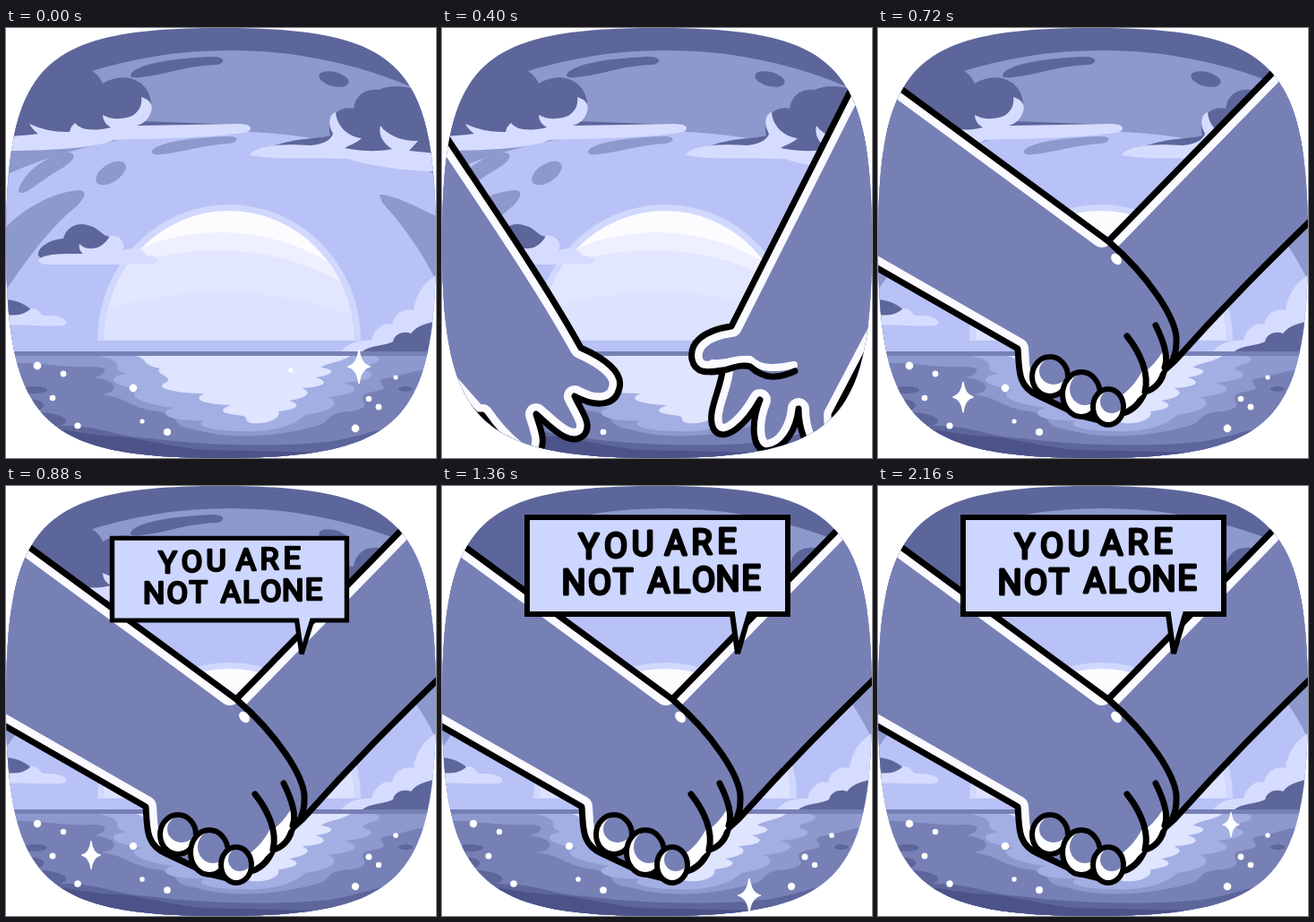
An HTML page for the animation above (2240 ms loop, 480x480 px).

```html
<!DOCTYPE html>
<html lang="en">
<head>
<meta charset="utf-8">
<title>You are not alone</title>
<style>
html, body { margin: 0; width: 100%; height: 100%; overflow: hidden; background: #fff }
svg { display: block; width: 100vw; height: 100vh }
.deep { fill: #4b5388 }
.dark { fill: #5d669b }
.skin { fill: #7780b5 }
.mid { fill: #8d98cc }
.soft { fill: #a3aee3 }
.light { fill: #b8c2f6 }
.pale { fill: #d6dcff }
.white { fill: #fff }
.ink, .shine { fill: none; stroke: #000; stroke-width: 7; stroke-linecap: round; stroke-linejoin: round }
.shine { stroke: #fafaff; stroke-width: 24 }
.thin { stroke-width: 8 }
text { font: 38px Roboto, "Liberation Sans", sans-serif; text-anchor: middle; stroke: #000; stroke-width: 3; stroke-linejoin: round }
</style>
</head>
<body>
<svg viewBox="0 0 480 480">
<defs>
  <clipPath id="frame"><path d="M240 0C440 0 480 40 480 240S440 480 240 480 0 440 0 240 40 0 240 0Z"/></clipPath>
  <clipPath id="sun"><path d="M110 348A139 144 0 0 1 388 348Z"/></clipPath>
</defs>
<g clip-path="url(#frame)">
  <!-- sky -->
  <path class="dark" d="M0 0H480V480H0Z"/>
  <ellipse class="mid" cx="250" cy="360" rx="423" ry="335"/>
  <ellipse class="light" cx="240" cy="360" rx="400" ry="245"/>
  <path class="dark" d="M139 52C145 41 180 34 230 32 244 32 246 38 236 41 200 42 180 52 150 55 143 56 138 55 139 52Z"/>
  <ellipse class="dark" cx="366" cy="57" rx="17" ry="8" transform="rotate(14 366 57)"/>
  <path class="mid" d="M163 137C170 127 210 122 248 121 260 121 261 126 250 129 220 130 195 140 172 141 165 142 162 140 163 137Z"/>
  <ellipse class="mid" cx="117" cy="162" rx="19" ry="10" transform="rotate(-33 117 162)"/>
  <path class="mid" d="M14 181C20 160 45 143 68 139 80 139 77 147 65 155 45 166 32 178 22 183 17 185 13 184 14 181Z"/>
  <path class="mid" d="M0 222C22 200 52 184 80 181 90 181 90 187 80 198 52 220 25 255 0 293Z"/>
  <path class="mid" d="M417 186C430 185 460 200 480 210V282C465 250 438 214 420 195Z"/>

  <!-- sun -->
  <path fill="#d0d8fd" d="M102 349A147 152 0 0 1 396 349Z"/>
  <g clip-path="url(#sun)">
    <path fill="#fcfcff" d="M100 190H400V350H100Z"/>
    <ellipse fill="#eef0ff" cx="240" cy="380" rx="190" ry="152"/>
    <ellipse fill="#e2e6ff" cx="235" cy="400" rx="215" ry="152"/>
    <ellipse fill="#dde2ff" cx="240" cy="420" rx="240" ry="125"/>
  </g>

  <!-- clouds -->
  <path class="dark" d="M0 45C35 35 50 34 72 39 92 42 104 52 108 62 130 48 158 56 162 82 163 94 155 100 150 104L262 108 200 118 0 126Z"/>
  <path class="pale" d="M0 121Q22 120 36 118 30 114 26 107 48 117 71 116 72 110 77 106 86 118 117 111 108 106 108 97 122 105 141 98 153 90 151 77 167 82 161 96 157 106 146 109L258 107C272 107 277 111 270 116 220 124 160 123 120 125 100 135 40 137 0 137Z"/>
  <path class="dark" d="M298 132C325 122 350 124 362 120 357 98 374 86 388 90 390 76 400 67 416 69 435 60 460 68 480 75V142H370Z"/>
  <path class="pale" d="M272 142C278 131 310 129 340 131 354 130 363 125 365 118 358 105 362 96 368 94 369 110 383 122 397 123 391 129 382 131 378 134 404 139 422 137 431 135 418 127 416 116 418 109 426 121 446 127 460 126L450 137 480 140V160C445 160 402 153 382 146 345 144 304 148 272 142Z"/>
  <path class="dark" d="M36 254C35 244 50 236 64 235 68 220 82 216 94 221 104 223 108 234 118 233 126 240 122 252 118 258L40 258Z"/>
  <path class="pale" d="M36 259C42 251 70 252 86 252 82 249 81 244 82 241 90 250 108 248 116 232 130 230 134 244 130 248 147 243 156 250 157 254 173 254 174 264 160 264H44Q36 263 36 259Z"/>
  <path class="dark" d="M0 303C16 304 28 312 34 322L0 332Z"/>
  <path class="pale" d="M0 320C16 322 22 318 28 313 38 313 38 320 42 321 66 320 72 329 64 332 40 334 20 330 0 332Z"/>
  <path class="pale" d="M374 361C382 351 396 348 408 349 411 336 422 328 431 331 433 318 446 312 455 315 457 296 468 283 480 276V361Z"/>
  <path class="dark" d="M398 361C406 354 424 355 432 350 434 340 446 338 452 341 460 330 472 331 480 326V361Z"/>

  <!-- sea -->
  <path class="mid" d="M0 361H480V480H0Z"/>
  <path class="skin" d="M0 361H480V366H0Z"/>
  <path class="skin" d="M0 374C30 372 70 380 96 378 120 378 110 388 98 390 130 394 124 408 106 409 140 414 136 424 170 428 200 434 180 444 210 448 250 460 300 456 340 446 370 440 350 430 385 428 420 422 380 412 410 406 440 402 400 394 430 390 450 386 460 380 480 382V480H0Z"/>
  <path class="soft" d="M104 366H412C430 374 392 376 400 382 420 388 400 394 378 396 404 404 380 410 360 412 380 422 350 430 334 432 320 446 290 452 262 450 230 450 208 444 222 438 180 440 166 428 188 424 150 420 130 408 152 404 120 400 108 390 134 386 112 380 140 374 104 366Z"/>
  <path class="pale" style="fill:#dfe4ff" d="M145 366H384C378 372 356 374 352 379 372 382 362 388 346 390 364 396 352 401 330 402 346 408 330 414 316 416 336 422 316 427 304 428 308 436 290 443 274 441 262 438 276 434 258 432 236 430 240 424 252 421 220 420 206 414 222 408 190 408 164 402 178 396 190 390 164 386 172 380 150 376 160 370 145 366Z"/>
  <path class="dark" d="M0 398C25 400 34 410 20 414 50 414 46 426 30 428 70 430 74 440 60 444 110 444 120 456 160 458 220 466 300 468 360 462 400 456 420 444 480 436V480H0Z"/>
  <path class="deep" d="M0 428C30 436 50 438 44 446 80 450 100 456 128 456 170 462 190 468 220 471L360 474 440 462 480 480H0Z"/>
  <ellipse class="dark" cx="446" cy="403" rx="8" ry="3"/>
  <ellipse class="dark" cx="32" cy="404" rx="14" ry="4"/>
  <g id="glints" class="white"></g>

  <!-- reaching arms -->
  <g id="reach">
    <g id="reachL" data-arm="M-145 -112L5 122C60 205 115 285 155 357 180 368 203 384 198 402 194 422 172 424 148 411 156 428 168 442 159 454 143 470 120 444 105 431 110 448 117 462 108 475 96 490 66 462 45 432L38 432-300 50Z"></g>
    <g id="reachR" data-arm="M535 -84L455 72 323 333C290 338 276 352 279 370 283 388 300 384 313 382 312 402 293 432 304 449 316 464 340 442 355 415 345 440 345 470 362 472 384 470 396 446 398 425 398 445 405 472 424 478 436 476 440 455 438 432L480 352 620 100Z">
      <path class="shine thin" d="M302 374C318 376 328 368 344 370 356 382 374 380 393 376"/>
      <path class="ink" d="M300 384C320 384 328 374 344 378 360 392 374 392 394 383"/>
    </g>
  </g>

  <!-- hands touching -->
  <g id="touch">
    <g data-arm="M540 -58L247 275 195 414C205 432 228 432 240 430 260 445 285 440 298 403 297 430 308 440 322 437 345 425 345 405 358 380 400 326 440 285 540 170Z"></g>
    <g data-arm="M-80 -8L20 78C100 143 190 227 243 275 290 300 320 305 321 330 321 345 313 353 303 354 314 372 300 392 272 394 276 412 262 420 235 415 210 410 190 400 168 388 168 410 163 427 150 428 132 425 135 400 136 381L-80 240Z"
       data-shine="M-80 -8L20 78C100 143 190 227 243 275M303 354C314 372 300 392 272 394 276 412 262 420 235 415 210 410 190 400 168 388 168 410 163 427 150 428 132 425 135 400 136 381L-80 240">
      <path class="ink" d="M258 342C275 349 290 354 303 354M232 373C250 378 264 384 272 394"/>
      <circle class="white" cx="243" cy="283" r="5"/>
    </g>
  </g>

  <!-- hands clasped -->
  <g id="clasp">
    <g data-arm="M540 -52L257 238 250 300 300 400 331 372C380 317 430 265 540 160Z" data-shine="M540 -52L257 238"></g>
    <g data-arm="M-60 5L257 238C300 275 335 325 333 350 333 365 328 375 320 379 318 395 308 404 298 406 292 420 283 428 272 430L256 440 227 433 178 410C155 400 158 380 156 358L-60 234Z"
       data-shine="M-60 5L250 233M320 379C318 395 308 404 298 406 292 420 283 428 272 430M178 410C155 400 158 380 156 358L-60 234">
      <path class="white" d="M298 406C300 396 299 386 297 378 290 395 280 404 270 412L272 430ZM320 379C322 370 321 362 320 356 316 366 308 376 300 382L298 406Z"/>
      <path class="ink" d="M278 344C293 363 303 386 298 406M310 332C318 348 325 366 320 379"/>
      <ellipse class="white" cx="266" cy="258" rx="5" ry="7" transform="rotate(-40 266 258)"/>
      <g id="knuckles"></g>
    </g>
  </g>

  <!-- speech bubble -->
  <g id="bubble">
    <path fill="#cdd6ff" stroke="#000" stroke-width="6" d="M95 35H386V143H343L330 187 324 143H95Z"/>
    <text x="164 194 224" y="81 80 78">YOU</text>
    <text x="261 290 318" y="77 76 75">ARE</text>
    <text x="147 176 202" y="121 121 120">NOT</text>
    <text x="242 267 292 319 345" y="119 119 118 117 116">ALONE</text>
  </g>
</g>
</svg>
<script>
const LOOP = 2240, STEP = 80;
const $ = id => document.getElementById(id);
const show = (id, on) => $(id).style.display = on ? '' : 'none';

// Each arm: fill, highlight kept inside the shape, then outline.
document.querySelectorAll('[data-arm]').forEach((g, i) => {
  const { arm, shine = arm } = g.dataset;
  g.insertAdjacentHTML('afterbegin', `<clipPath id="arm${i}"><path d="${arm}"/></clipPath>
    <path class="skin" d="${arm}"/><path class="shine" d="${shine}" clip-path="url(#arm${i})"/>
    <path class="ink" d="${arm}"/>`);
});

$('knuckles').innerHTML = [[192, 389, 20, 22], [227, 409, 21, 25], [257, 423, 17, 20]].map(([x, y, rx, ry]) =>
  `<ellipse class="white" cx="${x}" cy="${y}" rx="${rx}" ry="${ry}"/>
   <ellipse class="skin" cx="${x + 4}" cy="${y - 6}" rx="${rx - 4}" ry="${ry - 7}"/>
   <ellipse class="ink" style="stroke-width:6" cx="${x}" cy="${y}" rx="${rx}" ry="${ry}"/>`).join('');

const dots = [[35, 377, 4], [52, 413, 3.7], [64, 386, 3], [80, 444, 4], [142, 402, 4], [152, 439, 3],
  [180, 451, 3.7], [318, 382, 3], [390, 447, 4], [405, 414, 3.7], [416, 423, 3], [435, 390, 3]];
const stars = [[394, 378, 40], [95, 412, 790], [343, 457, 1400]];
const starPath = 'M0-21Q2-3 14 0 2 3 0 21-2 3-14 0-2-3 0-21Z';

function drawGlints(t) {
  const pulse = .4 * Math.cos(t / LOOP * 6 * Math.PI);
  $('glints').innerHTML = dots.map(([x, y, r], i) =>
    `<circle cx="${x}" cy="${y}" r="${r + (i % 2 ? -pulse : pulse)}"/>`).join('') +
    stars.map(([x, y, peak]) => {
      const gap = Math.abs(t - peak), size = Math.max(0, 1 - Math.min(gap, LOOP - gap) / 330);
      return `<path d="${starPath}" stroke="#fff" stroke-width="2" stroke-linejoin="round"
        transform="translate(${x} ${y}) scale(${size})"/>`;
    }).join('');
}

const pop = [[.45, .4], [.9, .85], [1, 1.07], [1, 1.03]];

function draw(now) {
  const t = Math.floor(now % LOOP / STEP) * STEP;
  drawGlints(t);
  show('reach', t >= 80 && t < 560);
  show('touch', t === 560);
  show('clasp', t >= 640);
  show('bubble', t >= 800);
  const swing = (400 - t) * (t < 400 ? .12 : .1);
  $('reachL').setAttribute('transform', `rotate(${swing} -100 16)`);
  $('reachR').setAttribute('transform', `rotate(${-swing} 560 35)`);
  $('clasp').setAttribute('transform', `translate(0 ${t === 640 ? 4 : 0})`);
  const [sx, sy] = pop[(t - 800) / STEP] || [1, 1];
  $('bubble').setAttribute('transform', `translate(330 190) scale(${sx} ${sy}) translate(-330 -190)`);
  requestAnimationFrame(loop);
}

const start = performance.now();
function loop() { draw(performance.now() - start); }
loop();
</script>
</body>
</html>
```
